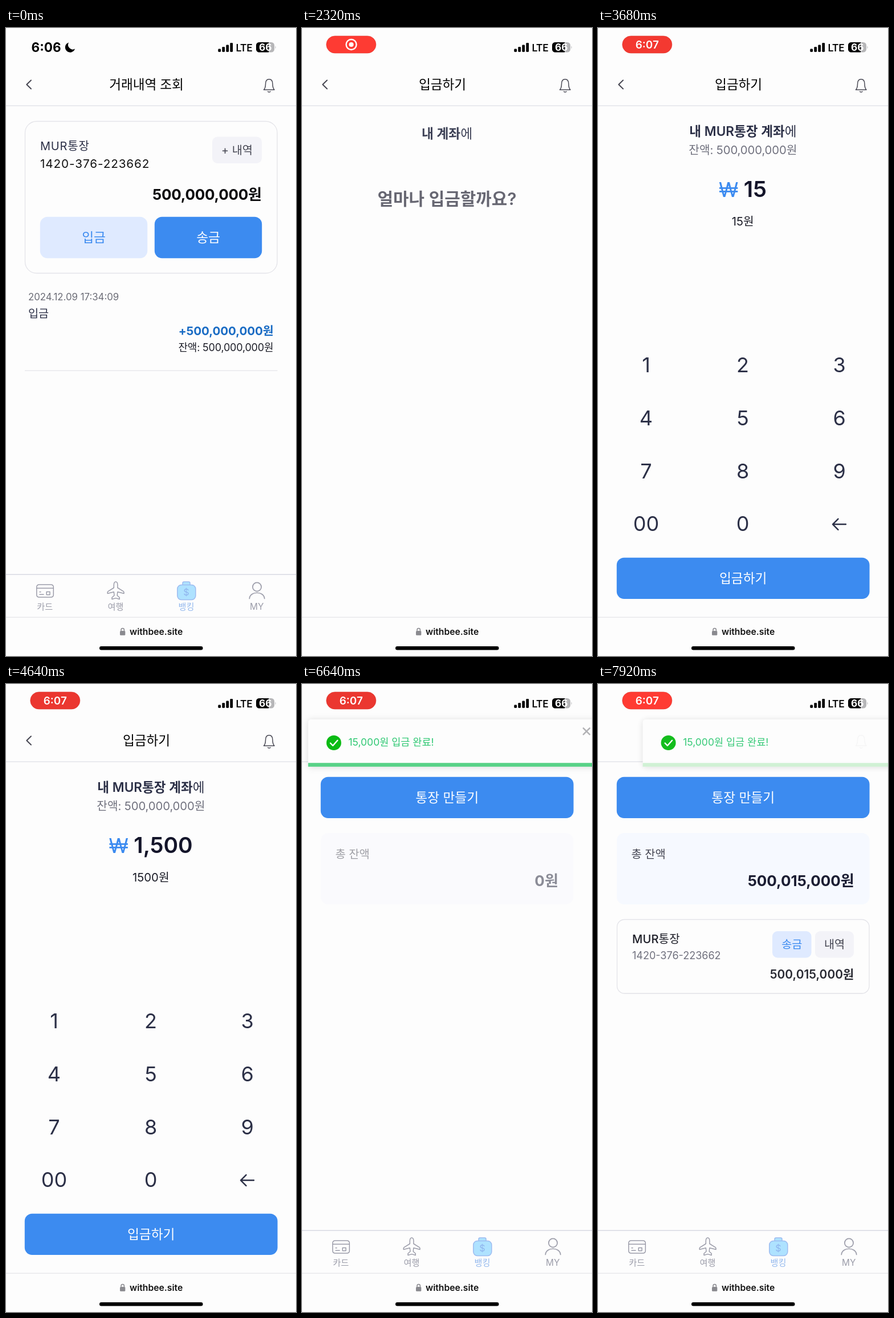
An HTML page for the animation above (8000 ms loop, 509x1100 px).

```html
<!DOCTYPE html>
<html lang="ko">
<head>
<meta charset="utf-8">
<title>입금하기</title>
<style>
html, body { margin: 0; width: 100%; height: 100%; overflow: hidden; background: #fdfdfd; }
svg { display: block; width: 509px; height: 1100px; font-family: Inter, 'Noto Sans CJK KR', 'Noto Sans CJK', sans-serif; }
text { white-space: pre; }
.line { fill: none; stroke-linecap: round; stroke-linejoin: round; }
</style>
</head>
<body>
<svg id="stage" viewBox="0 0 509 1100" xmlns="http://www.w3.org/2000/svg"></svg>
<script>
const LOOP = 8000, STEP = 80, SCALE = 509 / 393;
const BLUE = '#3c8bf0', INK = '#2c3047', GREY = '#9b9ca9', RULE = '#e4e4e9';

const text = (x, y, size, s, { c = INK, w = 400, a = 'start', ls = 0, id = '', f = '' } = {}) =>
  `<text x="${x}" y="${y}" font-size="${size}" fill="${c}" font-weight="${w}" text-anchor="${a}"` +
  `${ls ? ` letter-spacing="${ls}"` : ''}${id ? ` id="${id}"` : ''}${f ? ` font-family="${f}"` : ''}>${s}</text>`;
const mid = (x, y, size, s, o = {}) => text(x, y, size, s, { a: 'middle', ...o });
const end = (x, y, size, s, o = {}) => text(x, y, size, s, { a: 'end', ...o });
const rect = (x, y, w, h, r, fill, extra = '') =>
  `<rect x="${x}" y="${y}" width="${w}" height="${h}" rx="${r}" fill="${fill}" ${extra}/>`;
const line = (d, c, w, extra = '') => `<path class="line" d="${d}" stroke="${c}" stroke-width="${w}" ${extra}/>`;
const group = (id, ...parts) => `<g id="${id}">${parts.join('')}</g>`;
const button = (x, y, w, h, r, fill, label, size, c) =>
  rect(x, y, w, h, r, fill) + mid(x + w / 2, y + h / 2 + size * 0.365, size, label, { c });
const frame = (y, h, r) => rect(33.5, y, 442.5, h, r, '#fdfdfd', `stroke="${RULE}" stroke-width="1.3"`);

const status = [
  group('clock',
    text(44.6, 42, 22.5, '6:06', { c: '#000', w: 700 }),
    '<path d="M110 25.5A8.8 8.8 0 1 0 121 36.6A8.2 8.2 0 0 1 110 25.5Z"/>'),
  group('pill',
    rect(42.7, 13.9, 87.2, 30.2, 15.1, '#ff3b33', 'id="pillBody" stroke="#d9342c" stroke-width=".5"'),
    group('rec',
      '<circle cx="86.5" cy="29" r="9" fill="none" stroke="#fff" stroke-width="2.4"/>',
      '<circle cx="86.5" cy="29" r="4.1" fill="#fff"/>'),
    mid(86.3, 36, 18.8, '6:07', { c: '#fff', w: 600, id: 'pillTime' })),
  [0, 1, 2, 3].map(i => rect(372.3 + i * 7, 36.5 - i * 3.5, 4.8, 5.5 + i * 3.5, 1.4, '#000')).join(''),
  text(403.5, 40.7, 17.8, 'LTE', { c: '#000', w: 500, f: 'Roboto, sans-serif' }),
  rect(439, 25, 32, 17.5, 5.2, '#b6b6b8'),
  '<path d="M461 25H444.2A5.2 5.2 0 0 0 439 30.2V37.3A5.2 5.2 0 0 0 444.2 42.5H461Z"/>',
  '<path d="M472.5 31.2Q474.6 33.8 472.5 36.5Z" fill="#b6b6b8"/>',
  mid(455.2, 40, 17.4, '66', { c: '#fff', w: 700 })
].join('');

const header = [
  rect(0, 135.5, 509, 1.3, 0, '#e0e1e8'),
  line('M44 91.5L36.3 99L44 106.5', '#454550', 1.9, 'id="back"'),
  mid(246.5, 106.8, 22.6, '', { c: '#000', w: 500, id: 'title' }),
  line('M452.5 108.2H471C468.6 105.6 468 103.5 468 98.5C468 92.6 465.5 89.8 461.8 89.8C458 89.8 455.5 92.6 455.5 98.5C455.5 103.5 455 105.6 452.5 108.2ZM459.6 111.2Q461.8 113.4 464 111.2', '#4a4a55', 1.5)
].join('');

const browser = [
  rect(0, 1031.6, 509, 1.1, 0, '#e2e2e7'),
  rect(200, 1056, 9.3, 7.8, 1.5, '#8a8a8f'),
  line('M202 1056.5V1054.2A2.7 2.7 0 0 1 207.4 1054.2V1056.5', '#8a8a8f', 1.5),
  text(217, 1063, 15.7, 'withbee.site', { c: '#111', w: 600 }),
  rect(164, 1083, 181.5, 6.4, 3.2, '#000')
].join('');

const tabs = group('tabs',
  rect(0, 956.6, 509, 1.2, 0, '#cfd2dc'),
  line('M58.5 975H78.5Q83.3 975 83.3 979.5V992.5Q83.3 997 78.5 997H58.5Q53.8 997 53.8 992.5V979.5Q53.8 975 58.5 975ZM53.8 981.3H83.3M59 987.8H61M59 992.2H66M71.2 987.5H77V992.7H71.2Z', GREY, 1.5),
  line('M192.6 970C190.2 970 189.3 973 189.3 976V980.5L179 986.8Q177.8 987.8 178.2 990.5L189.3 987.7L190 994L186 997.5V1000.5L192.6 998.6L199.2 1000.5V997.5L195.2 994L195.9 987.7L207 990.5Q207.4 987.8 206.2 986.8L195.9 980.5V976C195.9 973 195 970 192.6 970Z', GREY, 1.5),
  line('M310 976V972.5Q310 970 312.5 970H320.5Q323 970 323 972.5V976', '#9dbcf0', 1.5, 'style="fill:#aee2ff"'),
  rect(300.8, 975.5, 32, 26, 7, '#aee2ff', 'stroke="#9dbcf0" stroke-width="1.5"'),
  mid(316.5, 994.2, 16, '$', { c: '#8fb4ee' }),
  '<circle cx="440.5" cy="979" r="7.6" fill="none" stroke="#9b9ca9" stroke-width="1.7"/>',
  line('M427.3 999.5C428 985.8 453 985.8 453.7 999.5', GREY, 1.7),
  mid(68.3, 1018.8, 15.2, '카드', { c: GREY }),
  mid(192.5, 1018.8, 15.2, '여행', { c: GREY }),
  mid(316.5, 1018.8, 15.2, '뱅킹', { c: '#94b9ee' }),
  mid(440.3, 1019, 15.4, 'MY', { c: GREY }));

const history = group('history',
  frame(163.5, 266, 20),
  text(60, 214, 20, 'MUR통장', { ls: 0.8 }),
  text(60, 245, 20.7, '1420-376-223662', { c: '#111', ls: 0.9 }),
  button(362, 190.5, 87, 46.5, 9, '#f3f3f8', '+ 내역', 19.7, '#42434f'),
  end(448.8, 301, 26, '500,000,000원', { c: '#0c0c0e', w: 700, ls: -0.25 }),
  button(59.8, 330.8, 188.4, 72.4, 13, '#dfeaff', '입금', 22.7, BLUE),
  button(260.8, 330.8, 188.4, 72.4, 13, BLUE, '송금', 22.7, '#fff'),
  text(39, 477, 16.8, '2024.12.09 17:34:09', { c: '#6b6c76' }),
  text(39, 507, 19.7, '입금'),
  end(469.6, 538.3, 20.6, '+500,000,000원', { c: '#1a6cc4', w: 700, ls: -0.1 }),
  end(469.3, 565.5, 18, '잔액: 500,000,000원', { c: '#1c1d27', ls: -0.2 }),
  rect(33, 599.5, 443.5, 1.2, 0, RULE));

const keys = ['1', '2', '3', '4', '5', '6', '7', '8', '9', '00', '0'].map((k, i) =>
  mid(84.5 + (i % 3) * 169.6, 603.2 + Math.floor(i / 3) * 92.7, 36, k)).join('');

const deposit = group('deposit',
  mid(254.5, 193, 22.7, '내 계좌<tspan font-weight="400">에</tspan>', { w: 600, id: 'plainLabel' }),
  group('account',
    mid(254.5, 189, 22.6, '내 MUR통장 계좌<tspan font-weight="400">에</tspan>', { w: 600 }),
    mid(254.3, 221.3, 20.3, '잔액: 500,000,000원', { c: '#70717e', ls: -0.1 })),
  mid(254.5, 309.5, 29.9, '얼마나 입금할까요?', { c: '#595966', w: 600, id: 'prompt' }),
  group('amount',
    mid(254, 296.3, 38.8, `<tspan font-size="36" font-weight="400" fill="${BLUE}">₩</tspan><tspan id="sum" dx="9.5"></tspan>`, { c: '#14152a', w: 600 }),
    mid(254.3, 345.5, 20.3, '', { c: '#1a1b26', id: 'words' })),
  group('keypad', keys,
    line('M435 869.3H412M421.5 859.8L412 869.3L421.5 878.8', INK, 2.4),
    button(32.8, 927.8, 443.8, 72.2, 13, BLUE, '입금하기', 22.7, '#fff'),
    rect(29.8, 924.8, 449.8, 78.2, 15, '#000', 'id="press" opacity=".26"')));

const banking = group('banking',
  button(32.8, 162.8, 443.8, 72.2, 13, BLUE, '통장 만들기', 22.7, '#fff'),
  group('total',
    rect(33, 261, 443.5, 125, 13, '#f6f9ff', 'id="totalBox"'),
    text(58.5, 304.5, 19.8, '총 잔액', { c: '#42434f' }),
    end(449.8, 354.3, 26, '', { c: '#1c1e33', w: 700, id: 'totalSum' })),
  group('wallet',
    frame(412.5, 129.5, 13),
    text(60, 453.5, 20, 'MUR통장', { c: '#1c1d27', w: 500, ls: 0.2 }),
    text(60, 482.2, 18, '1420-376-223662', { c: '#70717e' }),
    button(306, 433, 68.5, 46.5, 9, '#dfeaff', '송금', 19.7, BLUE),
    button(381, 433, 68, 46.5, 9, '#f3f3f8', '내역', 19.7, '#42434f'),
    end(449.2, 516, 20.9, '500,015,000원', { c: '#292a33', w: 600 })));

const toast = group('toast',
  rect(0, 62, 509, 83, 5, '#fdfdfd', 'style="filter:drop-shadow(0 1px 6px rgba(0,0,0,.13))"'),
  '<circle cx="45" cy="103" r="13" fill="#0bbb14"/>',
  line('M39 103.5L43.3 108L51.5 98.8', '#fff', 2.4),
  text(70.6, 107.5, 17.5, '15,000원 입금 완료!', { c: '#2fc873' }),
  line('M483 77.3L494 88.3M494 77.3L483 88.3', '#b2b2b5', 2.6),
  rect(0, 138.3, 509, 6.5, 0, '#cff1d3'),
  rect(0, 138.3, 509, 6.5, 0, '#58d287', 'id="bar"'));

document.getElementById('stage').innerHTML =
  rect(0, 0, 509, 1100, 0, '#fdfdfd') + header + history + deposit + banking + tabs + browser + toast + status;

const $ = id => document.getElementById(id);
const show = (id, on) => { $(id).style.display = on ? '' : 'none'; };
const fade = (id, o) => $(id).setAttribute('opacity', o);
const put = (id, s) => { if ($(id).textContent !== s) $(id).textContent = s; };
const ramp = (t, a, b) => Math.min(1, Math.max(0, (t - a) / (b - a)));

function bezier(x1, y1, x2, y2) {
  const at = (p, q, u) => 3 * p * u * (1 - u) ** 2 + 3 * q * u * u * (1 - u) + u ** 3;
  return x => {
    let lo = 0, hi = 1;
    for (let i = 0; i < 24; i++) {
      const m = (lo + hi) / 2;
      if (at(x1, x2, m) < x) lo = m; else hi = m;
    }
    return at(y1, y2, lo);
  };
}
const enterEase = bezier(0.215, 0.61, 0.355, 1), exitEase = bezier(0.25, 0.1, 0.25, 1);

function track(stops, p, ease) {
  const i = Math.max(1, stops.findIndex(s => s[0] >= p));
  const [p0, v0] = stops[i - 1], [p1, v1] = stops[i];
  return v0 + (v1 - v0) * ease(ramp(p, p0, p1));
}

const PILL = 400, DEPOSIT = 2080, LOADED = 2720, MINUTE = 3200, BANK = 6240, TOTAL = 6880;
const TOAST_IN = 6150, TOAST_OUT = 7748, TOAST_TIME = 700;
const ENTER = [[0, 3000], [0.6, -25], [0.75, 10], [0.9, -5], [1, 0]];
const EXIT = [[0, 0], [0.2, -20], [1, 2000]];
const TYPED = [[3280, '1', '1원'], [3600, '15', '15원'], [4160, '1,500', '1500원'], [4880, '15,000', '1만5000원']];

function drawStatus(t) {
  const on = ramp(t, PILL, PILL + 240);
  fade('clock', 1 - on);
  fade('pill', on);
  const wave = (1 - Math.cos((t - 100) / 1000 * Math.PI)) / 2;
  const dark = Math.max(0, (wave - 0.1) / 0.9);
  $('pillBody').setAttribute('fill', `rgb(${255 - 39 * dark},${59 - 7 * dark},${51 - 6 * dark})`);
  show('rec', t < MINUTE);
  show('pillTime', t >= MINUTE);
}

function drawDeposit(t) {
  const loaded = t >= LOADED, typed = TYPED.filter(k => t >= k[0]).pop();
  fade('deposit', ramp(t, DEPOSIT - 80, DEPOSIT + 270));
  show('plainLabel', !loaded);
  show('account', loaded);
  show('keypad', loaded);
  show('prompt', !typed);
  show('amount', typed);
  if (typed) {
    put('sum', typed[1]);
    put('words', typed[2]);
  }
  show('press', t >= 5600 && t < 5920);
}

function drawBanking(t) {
  const ready = t >= TOTAL;
  fade('total', 0.5 + 0.5 * ramp(t, TOTAL, TOTAL + 160));
  $('totalBox').setAttribute('fill', ready ? '#f6f9ff' : '#f8f8fd');
  put('totalSum', ready ? '500,015,000원' : '0원');
  show('wallet', ready);
}

function drawToast(t) {
  const out = t >= TOAST_OUT;
  const p = out ? ramp(t, TOAST_OUT, TOAST_OUT + TOAST_TIME) : ramp(t, TOAST_IN, TOAST_IN + TOAST_TIME);
  const x = SCALE * (out ? track(EXIT, p, exitEase) : track(ENTER, p, enterEase));
  show('toast', t >= TOAST_IN);
  $('toast').setAttribute('transform', `translate(${x} 0)`);
  fade('toast', out ? 1 - exitEase(ramp(p, 0.2, 1)) : 1);
  $('bar').setAttribute('width', 509 * (1 - ramp(t, TOAST_IN + TOAST_TIME, TOAST_OUT)));
}

function draw(t) {
  const first = t < DEPOSIT, bank = t >= BANK;
  show('history', first);
  show('deposit', !first && !bank);
  show('banking', bank);
  show('tabs', first || bank);
  show('back', !bank);
  put('title', bank ? '' : first ? '거래내역 조회' : '입금하기');
  drawStatus(t);
  drawDeposit(t);
  drawBanking(t);
  drawToast(t);
}

const start = performance.now();
function tick() {
  const t = (performance.now() - start) % LOOP;
  draw(Math.floor(t / STEP) * STEP);
  requestAnimationFrame(tick);
}
tick();
</script>
</body>
</html>
```
